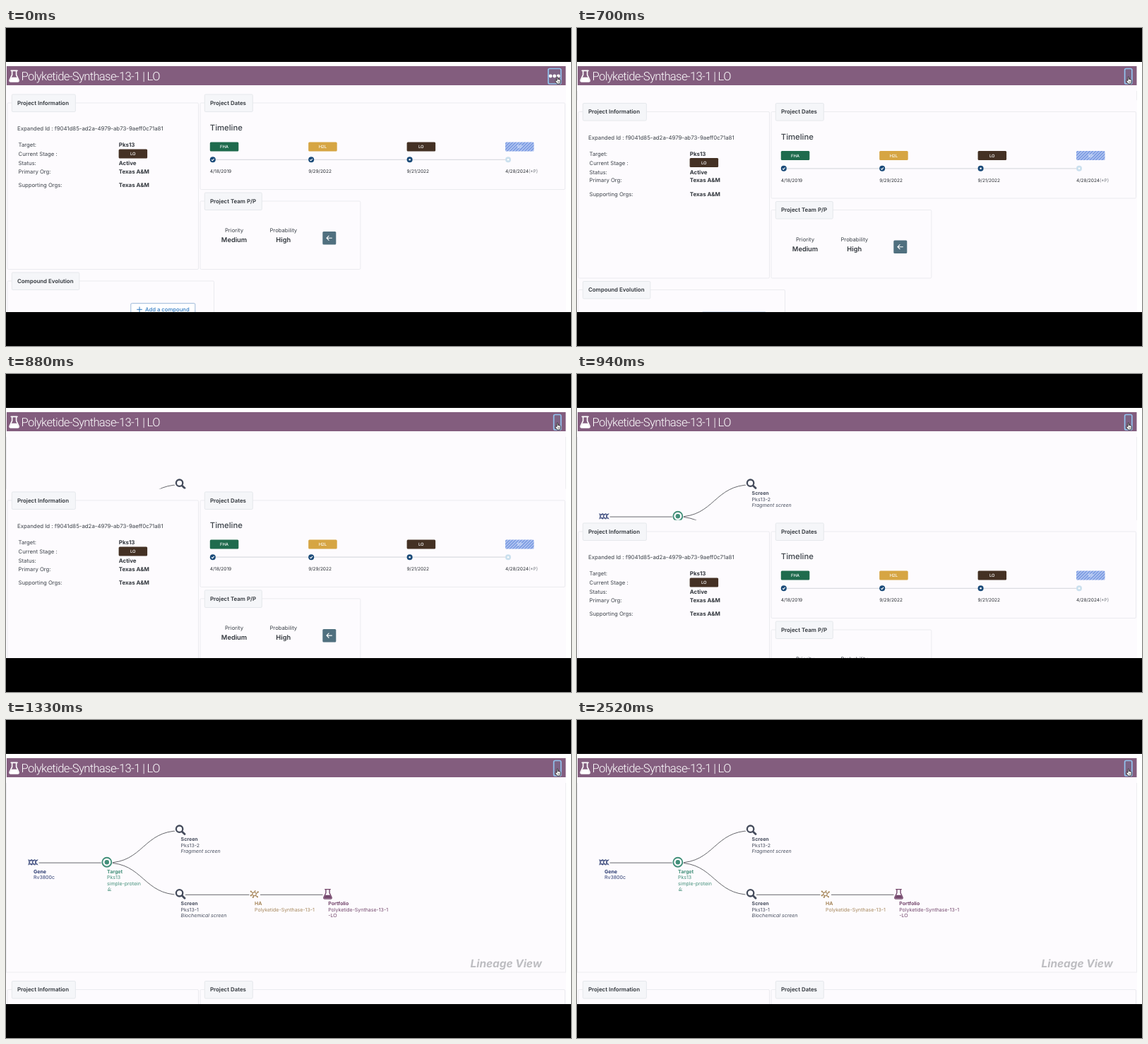
An HTML page that plays this animation: 800 by 450 pixels, repeating every 2580 ms.

```html
<!DOCTYPE html>
<html lang="en">
<head>
<meta charset="utf-8">
<title>Project overview</title>
<style>
  html, body { margin: 0; width: 100%; height: 100%; overflow: hidden; background: #000; }
  svg { display: block; width: 100%; height: 100%; }
  text { font-family: Inter, "Open Sans", sans-serif; text-rendering: geometricPrecision; white-space: pre; }
</style>
</head>
<body>
<svg id="stage" viewBox="0 0 800 450"></svg>
<script>
const LOOP = 2580;
const INK = '#3c4249', BOLD = '#30353b', SLATE = '#454c5c', PAPER = '#fdfbfe';
const GREEN = '#43907a', NAVY = '#2c3c72', TAN = '#a6865a', PLUM = '#74476c';

// --- drawing helpers ---
const text = (x, y, s, size = 7.7, fill = INK, weight = 400, extra = '') =>
  `<text x="${x}" y="${y}" font-size="${size}" fill="${fill}" font-weight="${weight}" ${extra}>${s}</text>`;
const rect = (x, y, w, h, fill, extra = '') =>
  `<rect x="${x}" y="${y}" width="${w}" height="${h}" fill="${fill}" ${extra}/>`;
const circle = (x, y, r, fill, extra = '') =>
  `<circle cx="${x}" cy="${y}" r="${r}" fill="${fill}" ${extra}/>`;
const path = (d, stroke, width = 1, fill = 'none', extra = '') =>
  `<path d="${d}" stroke="${stroke}" stroke-width="${width}" fill="${fill}" ${extra}/>`;
const at = (x, y, s, scale = 1) => `<g transform="translate(${x} ${y}) scale(${scale})">${s}</g>`;
const MID = 'text-anchor="middle"';
const ROUND = 'stroke-linecap="round" stroke-linejoin="round"';

const fieldset = (x, y, w, h, legendW, title) =>
  rect(x, y, w, h, 'none', 'rx="1.5" stroke="#ebebef" stroke-width="1"') +
  rect(x + 6.3, y - 12, legendW, 24.5, '#f5f6f9', 'rx="1.5" stroke="#e5e8ec" stroke-width="1"') +
  text(x + 14, y + 2.9, title, 7.9, BOLD, 600);

const badge = (x, y, fill, label, ink = '#fff') =>
  rect(x, y, 40.5, 13, fill, 'rx="1.5"') + text(x + 20.2, y + 8.6, label, 5.9, ink, 500, MID);

const flask = color =>
  path('M-3.8 -6.8H3.8M-2.6 -6.8V-1.6L-5.5 4.4Q-6.2 6.7 -4.2 6.7H4.2Q6.2 6.7 5.5 4.4L2.6 -1.6V-6.8', color, 1.4, 'none', ROUND) +
  path('M-3.4 1.4H3.4L5 4.8Q5.4 6.2 4 6.2H-4Q-5.4 6.2 -5 4.8Z', 'none', 0, color);

const lens = (x, y) => at(x, y,
  circle(0, 0, 7.5, PAPER) +
  circle(0, 0, 4.7, 'none', `stroke="${SLATE}" stroke-width="2.3"`) +
  path('M3.7 3.7L7.4 7.4', SLATE, 2.8, 'none', 'stroke-linecap="round"'));

const helix = () => {
  let d = '';
  for (let i = 0; i < 3; i++) {
    const x = -6.6 + i * 4.4;
    d += `M${x} -4Q${x + 0.4} 0 ${x + 4.4} 4M${x} 4Q${x + 0.4} 0 ${x + 4.4} -4`;
    d += `M${x + 0.6} -2.7H${x + 3.8}M${x + 0.6} 2.7H${x + 3.8}`;
  }
  return path(d, NAVY, 1);
};

const molecule = () => {
  const ring = 'M-2.6 -1.6L.4 -3L2.6 -.6L1.8 2.2L-1.2 2.6L-3 .8Z';
  const arms = 'M-2.6 -1.6L-5 -3.6M.4 -3L1.2 -5.2M2.6 -.6L5 -2.6M1.8 2.2L4 4M-1.2 2.6L-2 4.8M-3 .8L-5 1.8';
  return path(ring + arms, TAN, 1.2) +
    [[-5, -3.6], [5, -2.8], [4.2, 4.1], [-5, 2.2], [-2, 4.6]].map(([x, y]) => circle(x, y, 1.1, TAN)).join('');
};

// a leading ~ marks an italic line
const labels = (x, y, color, lines) => lines.map((s, i) =>
  text(x, y + i * 8.5, s.replace('~', ''), 7, color, i ? 400 : 700,
    s[0] === '~' ? 'font-style="italic"' : '')).join('');

// --- scene parts ---
const header =
  rect(0, 48, 800, 6, '#fff') +
  rect(1, 54, 791.5, 27, '#835d7e') +
  at(11.6, 68.2, flask('#fff'), 1.15) +
  text(21.6, 74.2, 'Polyketide-Synthase-13-1 | LO', 16.6, '#fff', 300,
    'style="font-family:Roboto,sans-serif;letter-spacing:-.64px"');

const hand = path(
  'M-1.6 .8V-3.6Q-1.6 -4.6 -.8 -4.6Q0 -4.6 0 -3.6V-1.2Q.8 -1.7 1.3 -.9Q2.2 -1.3 2.6 -.5Q3.6 -.7 3.6 .5V2.2Q3.6 4 2.6 5.2H-1.4Q-2.2 3.6 -3.6 1.6Q-4.2 .4 -3.1 .2Q-2.4 .2 -1.6 .8Z',
  '#222', 0.9, '#fff') + path('M-.3 1.6V3.6M1 1.6V3.6M2.3 1.6V3.6', '#333', 0.5);

const line = (x1, x2, y) => `M${x1} ${y}H${x2}`;
const branch = y => `M142.8 202.1C194.4 202.1 194.4 ${y} 246 ${y}`;
const tree =
  path(line(46.5, 135, 202.1) + line(254, 344.5, 247.3) + line(360, 448.5, 247.3) +
    branch(156.8) + branch(247.3), '#55565c', 0.9) +
  at(38.4, 201.3, helix()) +
  labels(39, 216.8, NAVY, ['Gene', 'Rv3800c']) +
  circle(142.8, 201.2, 8.2, PAPER) +
  circle(142.8, 201.2, 6.5, PAPER, `stroke="${GREEN}" stroke-width="1.9"`) +
  circle(142.8, 201.2, 3.2, GREEN) +
  labels(143, 216.8, GREEN, ['Target', 'Pks13', 'simple-protein']) +
  path('M144.4 240.8L146.6 236.6M145.8 241L148.4 238.6M144 241.4H149', GREEN, 0.8) +
  lens(245.6, 154.2) +
  labels(247.6, 171.4, SLATE, ['Screen', 'Pks13-2', '~Fragment screen']) +
  lens(245.6, 244.8) +
  labels(247.6, 262, SLATE, ['Screen', 'Pks13-1', '~Biochemical screen']) +
  at(351.8, 246.2, molecule()) +
  labels(352, 262, TAN, ['HA', 'Polyketide-Synthase-13-1']) +
  at(455.5, 246.4, flask(PLUM)) +
  labels(456.2, 262, PLUM, ['Portfolio', 'Polyketide-Synthase-13-1', '-LO']) +
  text(657.5, 350.2, 'Lineage View', 15.4, '#bdbdc1', 700, 'font-style="italic"');

const info = [['Target:', 'Pks13', 168], ['Current Stage :', '', 181], ['Status:', 'Active', 194.2],
  ['Primary Org:', 'Texas A&amp;M', 205.8], ['Supporting Orgs:', 'Texas A&amp;M', 225.2]]
  .map(([k, v, y]) => text(17.6, y, k) + text(159.8, y, v, 7.9, BOLD, 700)).join('');

const tick = '<path d="M-1.8 .1L-.5 1.4L1.9 -1.3" stroke="#fff" stroke-width="1.1" fill="none"/>';
const stages = [['FHA', '#1f6b4d', '4/18/2019'], ['H2L', '#d6a543', '9/29/2022'],
  ['LO', '#443124', '9/21/2022'], ['SP', 'url(#stripes)', '4/28/2024']]
  .map(([name, fill, date], i) => {
    const x = 288.8 + i * 139.4;
    const planned = i === 3;
    return badge(x, 161.5, fill, name, planned ? '#e9effc' : '#fff') +
      at(x + 4, 186.3, circle(0, 0, 4, planned ? '#cbe0ee' : '#1b4b79') +
        (i < 2 ? tick : circle(0, 0, 1.3, '#fff'))) +
      text(x, 205.3, date, 6.5, '#2b2f34');
  }).join('');

const page =
  fieldset(2, 106, 270.5, 235.5, 90, 'Project Information') +
  text(16, 145, 'Expanded Id : f9041d85-ad2a-4979-ab73-9aeff0c71a81', 7.83) +
  info + badge(159.6, 171.6, '#443124', 'LO') +
  fieldset(275, 106, 516.5, 122.5, 68, 'Project Dates') +
  text(288.8, 145.3, 'Timeline', 11.3, INK, 500) +
  path('M293 186.3H711', '#dadce1', 1.2) + stages +
  text(740, 205.3, '(*P)', 6.5, '#777b82') +
  fieldset(275, 245, 226.8, 96.5, 81, 'Project Team P/P') +
  text(323, 289.2, 'Priority', 7.7, INK, 400, MID) + text(323, 303.3, 'Medium', 9.3, BOLD, 600, MID) +
  text(392.8, 289.2, 'Probability', 7.7, INK, 400, MID) + text(392.8, 303.3, 'High', 9.3, BOLD, 600, MID) +
  rect(448.3, 288, 19, 18.6, '#50707f', 'rx="1.5"') +
  path('M461.8 297.2H454M457.4 293.8L454 297.2L457.4 300.6', '#fff', 1.1) +
  fieldset(2, 358, 292.5, 90, 95.5, 'Compound Evolution') +
  rect(176.8, 389.6, 91, 19, '#fff', 'rx="1.5" stroke="#9db9d9" stroke-width="1"') +
  path('M185.2 398.3H192.8M189 394.5V402.1', '#2f7ac2', 1) +
  text(197, 401.2, 'Add a compound', 7.7, '#2f7ac2', 500);

const RING = 'rx="2" stroke="#92c3ee" stroke-width="1.7"';
const $ = id => document.getElementById(id);

$('stage').innerHTML = `
  <defs>
    <pattern id="stripes" width="3" height="3" patternUnits="userSpaceOnUse" patternTransform="rotate(45)">
      ${rect(0, 0, 3, 3, '#c0cff5')}${rect(0, 0, 1.6, 3, '#7093df')}
    </pattern>
    <clipPath id="fold"><rect id="window" x="0" y="89" width="800" height="0"/></clipPath>
  </defs>
  ${rect(0, 48, 800, 354, PAPER)}${rect(793, 48, 7, 354, '#fff')}
  <g clip-path="url(#fold)">
    ${rect(0.5, 80, 792, 277, 'none', 'stroke="#ededf1" stroke-width="1"')}${tree}
  </g>
  <g id="page">${page}</g>
  ${header}
  <g id="dots">
    ${rect(767.8, 57.5, 18, 21.5, '#7d6283', RING)}
    ${[771, 776.6, 782.2].map(x => circle(x, 68, 2.4, '#fff')).join('')}
  </g>
  <g id="bare">${rect(775.6, 57.5, 10.2, 21.5, '#7d6283', RING)}</g>
  ${at(781.6, 73.8, hand)}
  ${rect(0, 0, 800, 48, '#000')}${rect(0, 402, 800, 48, '#000')}`;

// --- motion ---
const clamp = v => Math.min(1, Math.max(0, v));
const cubic = (a, b, s) => 3 * (1 - s) ** 2 * s * a + 3 * (1 - s) * s * s * b + s ** 3;
function easeInOut(x) {
  let lo = 0, hi = 1;
  for (let i = 0; i < 24; i++) {
    const mid = (lo + hi) / 2;
    if (cubic(0.645, 0.355, mid) < x) lo = mid; else hi = mid;
  }
  return cubic(0.045, 1, lo);
}

const CLICK = 547, UNFOLD = 838, SETTLED = 1315, HEIGHT = 268.5, MARGIN = 7;

function draw(t) {
  const open = t >= CLICK, done = t >= SETTLED;
  const fold = done ? HEIGHT : HEIGHT * easeInOut(clamp((t - CLICK) / UNFOLD));
  const shift = fold + (done ? MARGIN : 0);
  $('page').setAttribute('transform', `translate(0 ${shift.toFixed(2)})`);
  $('window').setAttribute('height', open ? (fold + 0.7).toFixed(2) : 0);
  $('dots').setAttribute('display', open ? 'none' : 'inline');
  $('bare').setAttribute('display', open ? 'inline' : 'none');
}

const start = performance.now();
function frame() {
  draw((performance.now() - start) % LOOP);
  requestAnimationFrame(frame);
}
frame();
</script>
</body>
</html>
```
